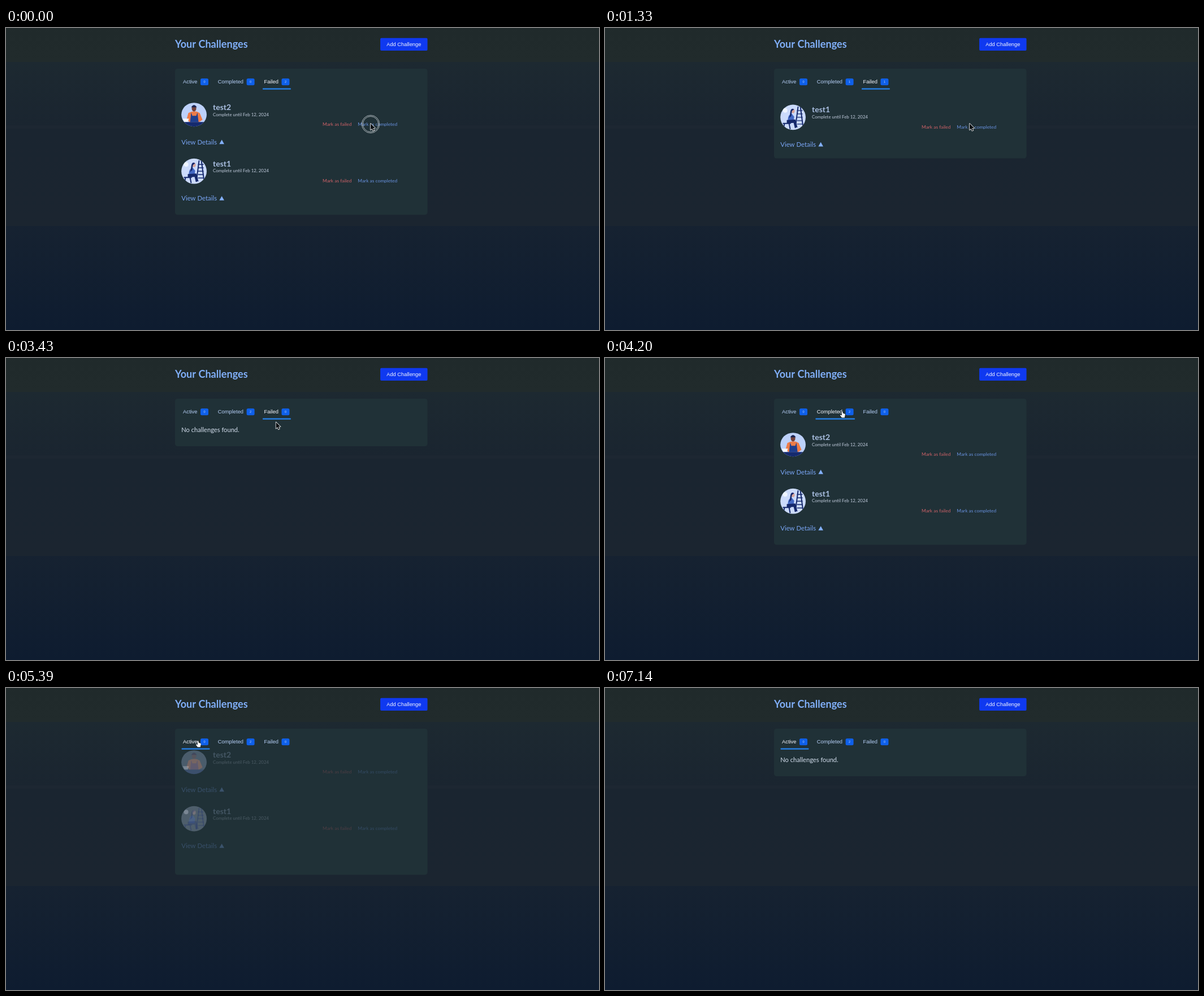
Recreate the animation shown at these times as an HTML page with a canvas. Size 1049 by 534 pixels, loop 7630 ms.

```html
<!DOCTYPE html>
<html lang="en">
<head>
<meta charset="utf-8">
<title>Your Challenges</title>
<style>
  html, body { margin: 0; width: 100%; height: 100%; overflow: hidden; background: #1a2530; }
  canvas { display: block; width: 1049px; height: 534px; }
</style>
</head>
<body>
<canvas id="stage"></canvas>
<script>
const W = 1049, H = 534, LOOP = 7630, TICK = 70;
const ROW = 99.6, EXIT = 300, GAP = 315;
const LATO = 'Lato, sans-serif', SANS = '"Liberation Sans", Arial, sans-serif';
const BLUE = '#7aa6f6', NAVY = '#15286b';

// When each view starts to leave; its successor follows after GAP.
const COUNTED = 560, FIRST = 647, SECOND = 2078, TO_COMPLETED = 3765, TO_ACTIVE = 5245;
const SLIDE = FIRST + 361, SLIDE_TIME = 450;

const canvas = document.getElementById('stage');
const ctx = canvas.getContext('2d');
const dpr = window.devicePixelRatio || 1;
canvas.width = W * dpr;
canvas.height = H * dpr;

// ---------- timing ----------
const clamp = v => Math.max(0, Math.min(1, v));
const span = (t, start, length) => clamp((t - start) / length);
const smooth = u => u * u * (3 - 2 * u);

function bezier(x1, y1, x2, y2) {
  const at = (a, b, s) => 3 * (1 - s) * (1 - s) * s * a + 3 * (1 - s) * s * s * b + s * s * s;
  return u => {
    let lo = 0, hi = 1;
    for (let i = 0; i < 24; i++) {
      const mid = (lo + hi) / 2;
      if (at(x1, x2, mid) < u) lo = mid; else hi = mid;
    }
    return at(y1, y2, (lo + hi) / 2);
  };
}
const ease = bezier(0.25, 0.1, 0.35, 1);
const relayout = bezier(0.4, 0, 0.1, 1);
const leaving = (t, start) => ease(span(t, start, EXIT));

// Remaining distance (1 to 0) of an underdamped spring after ms.
function spring(ms) {
  const s = Math.max(0, ms) / 1000, damp = 12.5, freq = 18.6;
  return Math.exp(-damp * s) * (Math.cos(freq * s) + damp / freq * Math.sin(freq * s));
}

// ---------- drawing helpers ----------
function text(str, x, y, font, color, align = 'left') {
  ctx.font = font;
  ctx.fillStyle = color;
  ctx.textAlign = align;
  ctx.fillText(str, x, y);
}
function box(x, y, w, h, r, color) {
  ctx.fillStyle = color;
  ctx.beginPath();
  ctx.roundRect(x, y, w, h, r);
  ctx.fill();
}
function oval(x, y, rx, ry, color) {
  ctx.fillStyle = color;
  ctx.beginPath();
  ctx.ellipse(x, y, rx, ry, 0, 0, Math.PI * 2);
  ctx.fill();
}
function shape(d, color) {
  ctx.fillStyle = color;
  ctx.fill(new Path2D(d));
}
function stroke(d, color, width) {
  ctx.strokeStyle = color;
  ctx.lineWidth = width;
  ctx.lineJoin = 'round';
  ctx.stroke(new Path2D(d));
}
function group(dy, alpha, draw) {
  if (alpha <= 0) return;
  ctx.save();
  ctx.globalAlpha = alpha;
  ctx.translate(0, dy);
  draw();
  ctx.restore();
}

// ---------- page ----------
function background() {
  const g = ctx.createLinearGradient(0, 0, 0, H);
  g.addColorStop(0, '#202a2b');
  g.addColorStop(0.112, '#212b2c');
  g.addColorStop(0.113, '#1d2931');
  g.addColorStop(0.33, '#1a2530');
  g.addColorStop(0.655, '#1b2530');
  g.addColorStop(0.656, '#162231');
  g.addColorStop(1, '#0e1c30');
  ctx.fillStyle = g;
  ctx.fillRect(0, 0, W, H);
  box(0, 172, W, 6, 0, '#1d2732');
}

function header() {
  text('Your Challenges', 299, 35.2, `bold 18.1px ${LATO}`, '#80aff9');
  box(662.1, 17.8, 83.5, 22.2, 2, '#0f39f0');
  text('Add Challenge', 703.8, 32, `9.36px ${SANS}`, '#f2f5ff', 'center');
}

function tabs(t) {
  const done = (t >= COUNTED) + (t >= SECOND);
  const active = 2 - (t >= TO_COMPLETED) - (t >= TO_ACTIVE);
  const counts = [0, done, 2 - done];
  let x = 313;
  ['Active', 'Completed', 'Failed'].forEach((name, i) => {
    text(name, x, 98.4, `9.36px ${SANS}`, i === active ? '#f4f7ff' : '#b6cff7');
    const badge = x + ctx.measureText(name).width + 5.6;
    box(badge, 89.2, 14, 12, 2.5, '#0f60ea');
    text(counts[i], badge + 7, 97.2, `5.6px ${SANS}`, '#b9d2fb', 'center');
    if (i === active) box(x - 2.5, 106.6, badge - x + 19, 2.1, 1, '#2583ee');
    x = badge + 30.8;
  });
}

// Avatars are drawn around their own centre.
function cook() {
  shape('M-10 -3Q1 -9 10 -3L15 9L9 13H-8L-13 8Z', '#ee7c48');
  shape('M-5 -4L-3 2H4L6 -4L8 13H-7Z', '#1f3f8f');
  oval(0, -11, 4, 5.2, '#74403a');
  shape('M-5 -13Q0 -21 5 -13Z', '#1a2350');
  shape('M-20 7H-9L-11 13H-17Z', '#f5f8ff');
  box(-23, 13, 46, 9, 0, '#152a6e');
}
function painter() {
  oval(-14, -12, 4, 4, '#eef4ff');
  stroke('M9 -19L4 19M13 -19L18 19', NAVY, 2);
  for (let y = -12; y < 14; y += 6) stroke(`M7 ${y}H17`, NAVY, 1.4);
  shape('M-9 8Q-10 -5 -2 -6L2 -1L1 8Z', '#4368c4');
  oval(0, -11, 3, 3.8, '#d9a59b');
  shape('M2 -14Q-4 -18 -5 -8T-9 3L-3 -2L-2 -11Z', NAVY);
  shape('M-11 5L4 4L8 18H3L1 10L-11 11Z', NAVY);
  stroke('M-18 11H-4M-15 11L-17 21M-7 11L-5 21', NAVY, 2);
}
function avatar(cy, ry, sky, draw) {
  ctx.save();
  ctx.translate(332.6, cy);
  ctx.beginPath();
  ctx.ellipse(0, 0, 22.4, ry, 0, 0, Math.PI * 2);
  ctx.clip();
  box(-23, -23, 46, 46, 0, sky);
  draw();
  ctx.restore();
}

function challenge(name) {
  if (name === 'test2') avatar(153.2, 21, '#bdd1fa', cook);
  else avatar(153.6, 22.4, '#cbdafb', painter);
  text(name, 366, 145, `bold 14px ${LATO}`, '#aabfe2');
  text('Complete until Feb 12, 2024', 366, 155.7, `7.9px ${LATO}`, '#c0cbdc');
  text('Mark as failed', 560, 173.4, `8.4px ${LATO}`, '#cf6268');
  text('Mark as completed', 622.3, 173.4, `8.4px ${LATO}`, '#6892e0');
  text('View Details', 310.2, 205.6, `11.4px ${LATO}`, BLUE);
  shape('M381.7 197.6L386 205.2H377.4Z', '#83b0fa');
}

const note = (dy, alpha) => group(dy, alpha, () =>
  text('No challenges found.', 310.2, 131, `11.15px ${LATO}`, '#d3deed'));
const enterNote = (t, start) => note(-20 * spring(t - start), smooth(span(t, start, 260)));
const leaveItem = (name, dy, p) => group(dy - 30 * p, 1 - p, () => challenge(name));

function panel(t) {
  const swapped = start => t >= start + GAP;
  let rows = 2, draw;

  if (swapped(TO_ACTIVE)) {
    rows = 0;
    draw = () => enterNote(t, TO_ACTIVE + GAP);
  } else if (swapped(TO_COMPLETED)) {
    const p = leaving(t, TO_ACTIVE), shown = span(t, TO_COMPLETED + GAP, 90);
    draw = () => group(-30 * p, (1 - p) * shown, () => {
      challenge('test2');
      ctx.translate(0, ROW);
      challenge('test1');
    });
  } else if (swapped(SECOND)) {
    const p = leaving(t, TO_COMPLETED);
    rows = 0;
    draw = () => p > 0 ? note(-20 * p, 1 - p) : enterNote(t, SECOND + GAP);
  } else {
    rows = swapped(FIRST) ? 1 : 2;
    const dy = ROW * (1 - relayout(span(t, SLIDE, SLIDE_TIME)));
    draw = () => {
      leaveItem('test2', 0, leaving(t, FIRST));
      leaveItem('test1', dy, leaving(t, SECOND));
    };
  }

  box(299, 72, 446.6, rows ? 59 + rows * ROW : 84, 4.5, '#203137');
  tabs(t);
  draw();
}

// ---------- pointer ----------
function pointerAt(t) {
  const moves = [
    { start: 3010, length: 630, to: [419, 94] },
    { start: 4550, length: 560, to: [339, 93], dip: 59 },
    { start: 6090, length: 280, to: [341, 94] },
    { start: 6440, length: 280, to: [536, 386] },
    { start: 6930, length: 210, to: [520, 545] }
  ];
  let x = 645, y = 169;
  for (const { start, length, to, dip = 0 } of moves) {
    const u = smooth(span(t, start, length));
    x += (to[0] - x) * u;
    y += (to[1] - y) * u + dip * Math.sin(Math.PI * u);
  }
  return [x, y];
}

function arrow() {
  const d = 'M0 0V11.2L2.6 8.8L4.3 12.7L6.2 11.9L4.5 8H8Z';
  stroke(d, '#f4f6f8', 1.6);
  shape(d, '#0b0f12');
}
function hand() {
  const d = 'M-.5 .8Q.4 -.4 1.3 .8L1.9 3.8L5 4.7Q6 5 5.9 6L4.8 11.6H0L-3 7.6Q-3.4 6.2 -2 6.4L0 7.6Z';
  stroke(d, '#11191e', 1);
  shape(d, '#fafbfc');
}

function pointer(t) {
  const [x, y] = pointerAt(t);

  for (const click of [TICK, SECOND, TO_COMPLETED, TO_ACTIVE]) {
    if (t >= click || t < click - 2 * TICK) continue;
    const r = t ? 25 : 15.7;
    ctx.strokeStyle = `rgba(235,240,245,${t ? 0.32 : 0.75})`;
    ctx.lineWidth = 0.9;
    for (const radius of [r, r - 2]) {
      ctx.beginPath();
      ctx.arc(x, y + 1, radius, 0, Math.PI * 2);
      ctx.stroke();
    }
  }

  const overTab = y < 107;
  const overLink = (t > 0 && t < SLIDE) || (t >= SLIDE + SLIDE_TIME && t < SECOND + GAP);
  ctx.save();
  ctx.translate(x, y);
  if (overTab || overLink) hand(); else arrow();
  ctx.restore();
}

function render(t) {
  ctx.setTransform(dpr, 0, 0, dpr, 0, 0);
  background();
  header();
  panel(t);
  pointer(t);
}

const began = performance.now();
function frame() {
  const t = (performance.now() - began) % LOOP;
  render(Math.floor(t / TICK) * TICK);
  requestAnimationFrame(frame);
}
frame();
</script>
</body>
</html>
```
